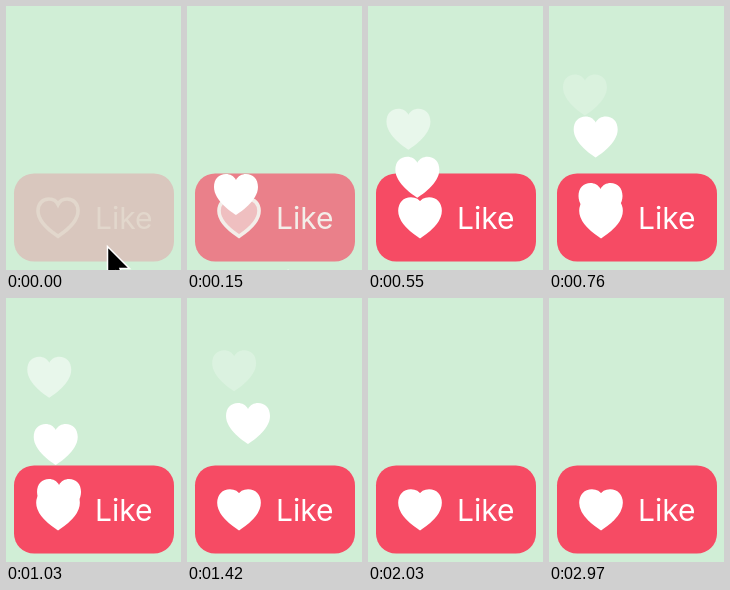
These frames come from a looping animation (175 by 264 pixels, 3 s). An HTML page:

```html
<!DOCTYPE html>
<html lang="en">
<head>
<meta charset="utf-8">
<title>Like button</title>
<style>
html, body { margin: 0; width: 100%; height: 100%; overflow: hidden; background: #d0eed6; }
svg { display: block; }
text { font: 400 30px Inter, Roboto, sans-serif; }
</style>
</head>
<body>
<svg width="175" height="264" viewBox="0 0 175 264">
  <defs>
    <path id="heart" d="M22 41C19 39 0 27 0 13C0 5 5 0 12 0C16 0 20 2 22 6C24 2 28 0 32 0C39 0 44 5 44 13C44 27 25 39 22 41Z"/>
  </defs>
  <rect id="button" x="8" y="167.5" width="160" height="88" rx="20"/>
  <g id="label">
    <use href="#heart" id="icon" transform="translate(32 193) scale(.91)" stroke="currentColor" stroke-width="4" fill="currentColor"/>
    <text x="89" y="223" fill="currentColor">Like</text>
  </g>
  <g id="floaters" fill="#fff"></g>
  <path id="cursor" d="M101.5 240.500V272l7.500-7l5 12l5-2l-5-12.500h9.500Z" stroke="#fff" stroke-width="1.500"/>
</svg>
<script>
const LOOP = 3000;
const $ = id => document.getElementById(id);
const clamp = v => Math.min(1, Math.max(0, v));
const mix = (a, b, k) => `rgb(${a.map((v, i) => Math.round(v + (b[i] - v) * k))})`;

// start (ms), speed (px/ms), sideways drift per px risen, fade start and end (ms)
const hearts = [
  [10, .163, -.131, 200, 900],
  [342, .192, -.066, 850, 1210],
  [687, .189, -.035, 1150, 1500],
  [980, .195, .105, 1500, 1850]
].map(([start, speed, drift, fadeFrom, fadeTo]) => {
  const el = document.createElementNS('http://www.w3.org/2000/svg', 'use');
  el.setAttribute('href', '#heart');
  $('floaters').append(el);
  return { el, start, speed, drift, fadeFrom, fadeTo };
});

function draw(t) {
  const on = clamp((t - 30) / 210);
  $('button').setAttribute('fill', mix([217, 199, 190], [246, 75, 100], on));
  $('label').style.color = mix([226, 215, 204], [255, 255, 255], on);
  $('icon').setAttribute('fill-opacity', on);
  $('cursor').setAttribute('transform', `translate(0 ${clamp((t - 30) / 150) * 30})`);

  for (const h of hearts) {
    const rise = (t - h.start) * h.speed;
    const alpha = t < h.start ? 0 : 1 - clamp((t - h.fadeFrom) / (h.fadeTo - h.fadeFrom));
    h.el.setAttribute('transform', `translate(${30 + rise * h.drift} ${191 - rise})`);
    h.el.setAttribute('opacity', alpha);
  }
}

const begin = performance.now();
function tick() {
  draw((performance.now() - begin) % LOOP);
  requestAnimationFrame(tick);
}
draw(0);
requestAnimationFrame(tick);
</script>
</body>
</html>
```
